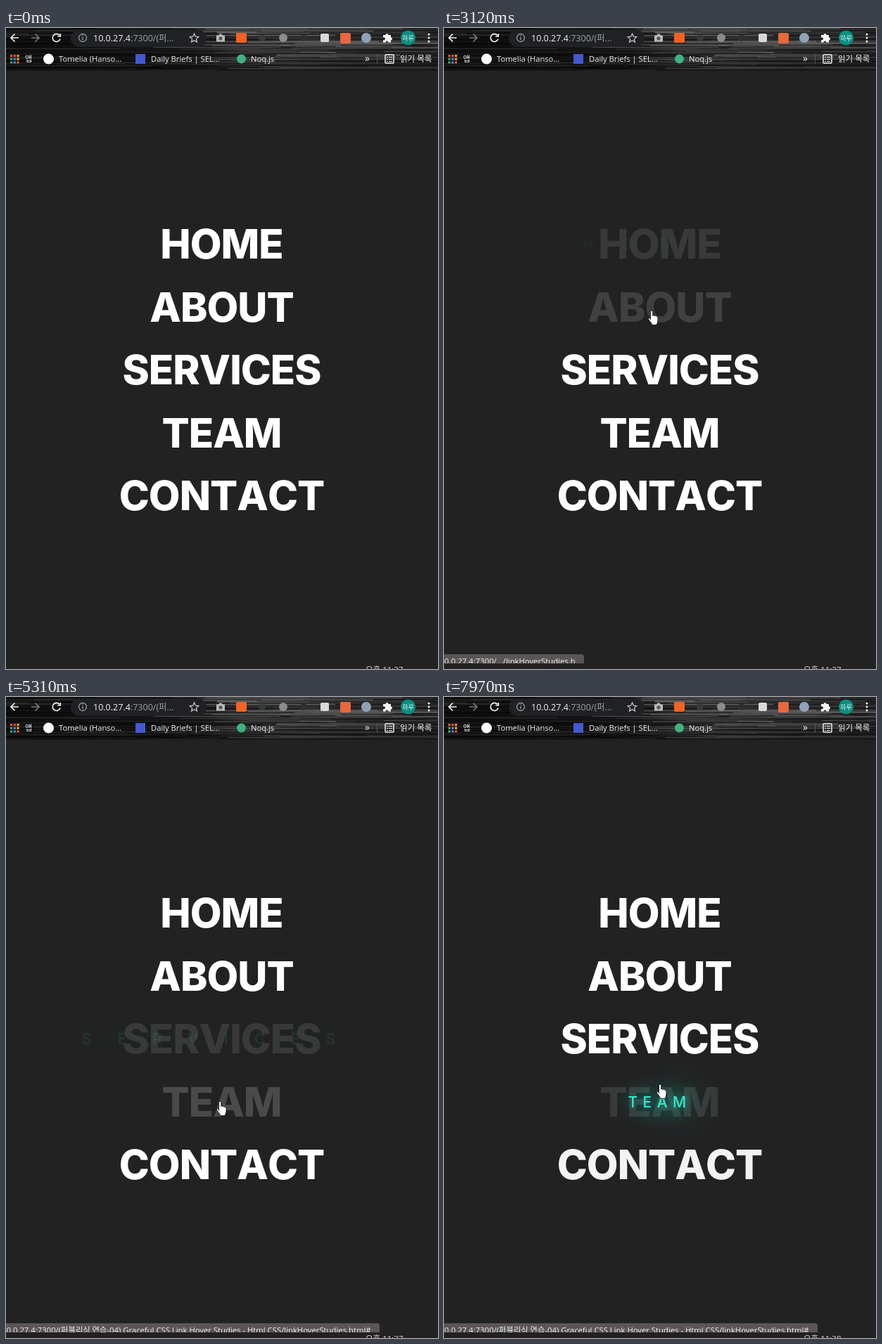
Animation of 614 by 912 pixels, one loop 8 s. Source, as an HTML page with a canvas:

```html
<!DOCTYPE html>
<html lang="ko">
<head>
<meta charset="utf-8">
<title>Menu hover</title>
<style>
  html, body { margin: 0; width: 100%; height: 100%; overflow: hidden; background: #222; }
  body { position: relative; font-family: Inter, sans-serif; }
  canvas, svg { position: absolute; left: 0; top: 0; }
  .bar { font: 11.2px "Open Sans", "Noto Sans CJK KR", "Noto Sans CJK", sans-serif; fill: #f1f1f1; }
  .word, .glow {
    position: absolute; left: 306.5px; transform: translate(-50%, -50%);
    white-space: nowrap; line-height: 1;
  }
  .word { font-size: 58px; font-weight: 800; letter-spacing: -1px; font-kerning: none; color: #fff; }
  .glow {
    font-size: 21px; font-weight: 500; color: #35f5dc;
    text-shadow: 0 0 10px #1cc8b480, 0 0 30px #1cc8b4, 0 0 40px #1cc8b4, 0 0 80px #1cc8b4, 0 0 80px #1cc8b4;
  }
  #status {
    position: absolute; left: 0; top: 891px; height: 13px; overflow: hidden;
    background: #5b5655; border-radius: 0 4px 0 0; white-space: nowrap;
    font: 11.3px/20px "Open Sans", "Noto Sans CJK KR", "Noto Sans CJK", sans-serif; color: #f0f0f0;
  }
  #status span { margin-left: -6px; }
  #clock {
    position: absolute; left: 511px; top: 904px; height: 8px; overflow: hidden; white-space: nowrap;
    font: 11.5px/17px "Open Sans", "Noto Sans CJK KR", "Noto Sans CJK", sans-serif; color: #ddd;
  }
</style>
</head>
<body>
<canvas id="texture" width="614" height="61"></canvas>

<svg class="bar" width="614" height="61">
  <rect x="92" y="2" width="193" height="25" rx="12.5" fill="#202124"/>
  <g fill="none" stroke="#f1f1f1" stroke-width="1.7">
    <path d="M18 14H7.500M12.500 8.500L7 14l5.500 5.500"/>
    <path d="M36 14h10.500M41.500 8.500L47 14l-5.500 5.500" stroke="#777"/>
    <path d="M76 10.500a5.500 5.500 0 1 0 1 5M77.300 8v4h-4"/>
    <g stroke="#9aa0a6" stroke-width="1.300">
      <circle cx="109" cy="14" r="5.500"/>
      <path d="M109 13v4M109 10.500v1.300"/>
    </g>
    <path d="M267.500 8l1.800 4.200 4.500.4-3.400 3 1 4.400-3.900-2.300-3.900 2.300 1-4.400-3.400-3 4.500-.4z" stroke="#ccc" stroke-width="1.200"/>
    <rect x="539" y="38" width="12" height="12" rx="1" stroke-width="1.500"/>
    <path d="M541 41.500h2m1 0h5m-8 3h2m1 0h5m-8 3h2m1 0h5" stroke-width="1.200"/>
    <path d="M527.500 37v14" stroke="#555" stroke-width="1"/>
  </g>
  <text x="124" y="18.500" font-size="12.500">10.0.27.4<tspan fill="#9aa0a6">:7300/(퍼...</tspan></text>

  <path d="M299 10.500h3l1.500-2h3l1.500 2h3v9h-12z" fill="#bbb"/>
  <circle cx="305" cy="14.800" r="2.600" fill="#555"/>
  <rect x="327" y="7" width="15" height="14" rx="2" fill="#f26322"/>
  <circle cx="364" cy="14" r="5" fill="#3a3a3a"/>
  <circle cx="394" cy="14" r="6" fill="#8b8b8b"/>
  <circle cx="423" cy="14" r="5" fill="#303030"/>
  <rect x="447" y="8" width="12" height="12" rx="2" fill="#d8d8d8"/>
  <rect x="475" y="7" width="15" height="15" rx="2" fill="#e8673c"/>
  <circle cx="512" cy="14" r="7" fill="#8fa3b8"/>
  <path d="M536 10h3.500a2 2 0 1 1 4 0h3.500v3.500a2 2 0 1 1 0 4V20.500h-3.500a2 2 0 1 0-4 0H536v-3.500a2 2 0 1 0 0-3.500z" fill="#f4f4f4"/>
  <circle cx="571.500" cy="14" r="10.500" fill="#0a8f80"/>
  <text x="571.500" y="17.500" font-size="9" text-anchor="middle">하루</text>
  <g fill="#f1f1f1"><circle cx="601" cy="9" r="1.500"/><circle cx="601" cy="14" r="1.500"/><circle cx="601" cy="19" r="1.500"/></g>

  <g id="apps"></g>
  <text x="27" y="47.500">앱</text>
  <circle cx="60.500" cy="44" r="7.500" fill="#fff"/>
  <text x="75" y="47.500">Tomelia (Hanso...</text>
  <rect x="184" y="37" width="14" height="14" fill="#4458d0"/>
  <text x="206" y="47.500">Daily Briefs | SEL...</text>
  <circle cx="334.500" cy="44" r="6.500" fill="#3fb27f"/>
  <text x="348" y="47.500">Noq.js</text>
  <text x="510" y="47.500" font-size="14">»</text>
  <text x="560" y="47.500" font-size="11.500">읽기 목록</text>
</svg>

<div id="menu"></div>
<div id="status"><span></span></div>
<div id="clock"></div>

<svg width="614" height="912">
  <g id="cursor" fill="#fff" stroke="#111" stroke-width=".9" stroke-linejoin="round">
    <path id="arrow" d="M0 0V16.500l3.800-3.600 2.500 5.900 2.500-1.100-2.500-5.700h5.300z"/>
    <path id="hand" d="M-1.500 13V1.700a1.600 1.600 0 0 1 3.200 0V7q1.500-.8 2.600.4 1.500-.6 2.400.6 2.200-.4 2.300 2V14q0 3-2 6.500H1Q-1 16.500-4.200 12.800q-.8-1.600.6-2.200 1.200 0 2.100 1.400z"/>
  </g>
</svg>

<script>
const LOOP = 8000, FADE = 500, DELAY = 530, DIM = 0.1;
const $ = id => document.getElementById(id);
const clamp = v => Math.min(1, Math.max(0, v));
const mix = (a, b, k) => a + (b - a) * k;

// each word with its hover spans [enter, leave]
const words = [
  ["HOME", [1600, 2740]],
  ["ABOUT", [2740, 3840]],
  ["SERVICES", [3840, 4990]],
  ["TEAM", [4990, 5965], [7090, 9999]],
  ["CONTACT", [5965, 7090]]
];

// pointer stops: time, x, y
const stops = [
  [120, 612, 916], [860, 344, 157], [1000, 344, 157], [1500, 299, 290],
  [2500, 299, 290], [2980, 295, 402], [3620, 295, 402], [4060, 301, 490],
  [4760, 301, 490], [5240, 304, 575], [5800, 305, 580], [6050, 311, 638],
  [6200, 311, 652], [6860, 311, 652], [7070, 308, 604], [7280, 307, 551]
];

// cubic-bezier(.25, .1, .25, 1)
function ease(p) {
  p = clamp(p);
  if (p === 0 || p === 1) return p;
  const curve = (a, b, s) => 3 * (1 - s) * s * ((1 - s) * a + s * b) + s ** 3;
  let lo = 0, hi = 1;
  for (let i = 0; i < 20; i++) {
    const mid = (lo + hi) / 2;
    if (curve(0.25, 0.25, mid) < p) lo = mid; else hi = mid;
  }
  return curve(0.1, 1, lo);
}

function addText(cls, text, y) {
  const el = document.createElement("div");
  el.className = cls;
  el.textContent = text;
  el.style.top = y + "px";
  return $("menu").appendChild(el);
}

const items = words.map(([text, ...spans], i) => {
  const y = 307 + i * 89.5;
  return { spans, word: addText("word", text, y), glow: addText("glow", text, y) };
});

// brushed metal, lightest right of the address field
function drawTexture() {
  const c = $("texture").getContext("2d");
  let seed = 11;
  const rnd = () => (seed = seed * 16807 % 2147483647) / 2147483647;
  const base = c.createLinearGradient(0, 0, 614, 0);
  base.addColorStop(0, "#0d0d0d");
  base.addColorStop(0.42, "#161616");
  base.addColorStop(0.55, "#383838");
  base.addColorStop(1, "#1c1c1c");
  c.fillStyle = base;
  c.fillRect(0, 0, 614, 61);
  for (let i = 0; i < 200; i++) {
    const x = rnd() * 760 - 140, len = 80 + rnd() * 260, y = rnd() * 60;
    const light = x + len / 2 > 290 ? 1 : 0.55;
    const g = Math.round((i % 2 ? 8 + rnd() * 20 : 50 + rnd() * 70) * light);
    c.strokeStyle = `rgba(${g},${g},${g},.7)`;
    c.lineWidth = 0.5 + rnd() * 1.3;
    c.beginPath();
    c.moveTo(x, y);
    c.bezierCurveTo(x + len / 3, y + rnd() * 4 - 2, x + len / 1.5, y + rnd() * 4 - 2, x + len, y);
    c.stroke();
  }
  c.fillStyle = "#1a1a1a";
  c.fillRect(0, 60, 614, 1);
}

function drawApps() {
  const colors = ["#e8563f", "#e8563f", "#f0a030", "#45a55a", "#4a86e8", "#f0a030", "#45a55a", "#4a86e8", "#e8563f"];
  $("apps").innerHTML = colors.map((c, i) =>
    `<rect x="${6 + i % 3 * 4.7}" y="${38 + Math.floor(i / 3) * 4.7}" width="3.2" height="3.2" fill="${c}"/>`).join("");
}

function showItem({ spans, word, glow }, t) {
  let dim = 0, lit = 0;
  for (const [enter, leave] of spans) {
    dim += ease((t - enter) / FADE) - ease((t - leave - DELAY) / FADE);
    lit += ease((t - enter - DELAY) / FADE) - ease((t - leave) / FADE);
  }
  word.style.opacity = mix(1, DIM, dim);
  glow.style.opacity = lit;
  glow.style.letterSpacing = mix(40, 5.4, lit) + "px";
}

function showCursor(t) {
  const i = stops.findIndex(s => s[0] > t);
  const b = stops[i < 0 ? stops.length - 1 : i];
  const a = i > 0 ? stops[i - 1] : b;
  const p = a === b ? 0 : (t - a[0]) / (b[0] - a[0]);
  const k = p * p * (3 - 2 * p);
  const y = mix(a[2], b[2], k);
  const onLink = t > 1000 && y > 262;
  $("cursor").setAttribute("transform", `translate(${mix(a[1], b[1], k)} ${y})`);
  $("arrow").style.display = onLink ? "none" : "";
  $("hand").style.display = onLink ? "" : "none";
}

function showStatus(t) {
  const bar = $("status");
  bar.style.opacity = clamp((t - 1720) / 120);
  bar.style.width = mix(199, 531, ease((t - 3400) / 250)) + "px";
  bar.firstChild.textContent = t < 3400
    ? "10.0.27.4:7300/.../linkHoverStudies.h"
    : "10.0.27.4:7300/(퍼블리싱 연습-04) Graceful CSS Link Hover Studies - Html CSS/linkHoverStudies.html#";
  $("clock").textContent = t < 7240 ? "오후 11:37" : "오후 11:38";
}

function frame(now) {
  const t = now % LOOP;
  items.forEach(item => showItem(item, t));
  showCursor(t);
  showStatus(t);
  requestAnimationFrame(frame);
}

drawTexture();
drawApps();
requestAnimationFrame(frame);
</script>
</body>
</html>
```
